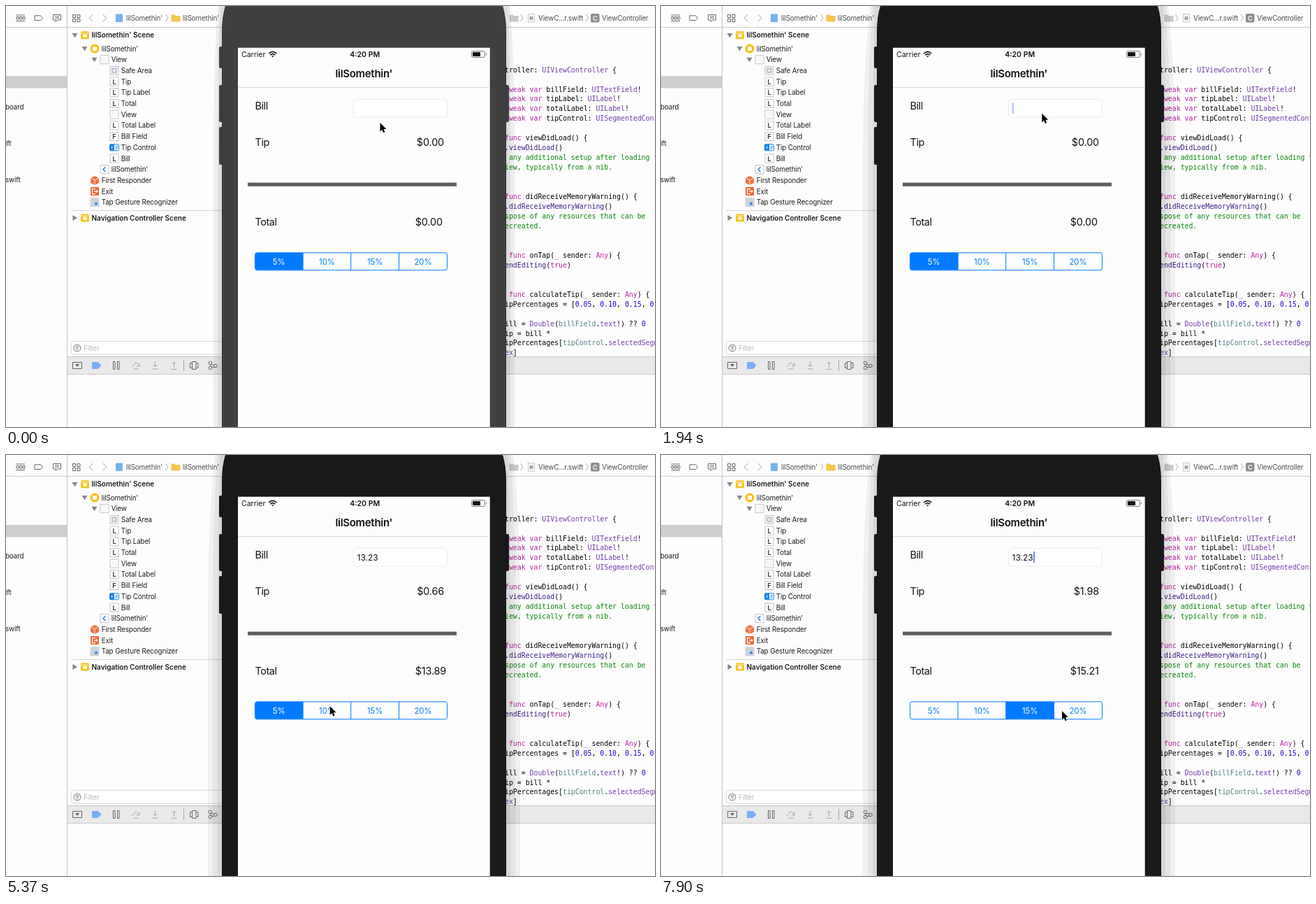
Recreate the animation shown at these times as an HTML page. Size 929 by 602 pixels, loop 8000 ms.

```html
<!DOCTYPE html>
<html lang="en">
<head>
<meta charset="utf-8">
<title>Tip calculator</title>
<style>
  html, body { margin: 0; width: 100%; height: 100%; overflow: hidden; background: #fdfdfd; }
  svg { display: block; }
  text { font-family: Inter, "Liberation Sans", sans-serif; white-space: pre; }
  .ide { font-size: 9.85px; letter-spacing: -.12px; fill: #1c1c1c; }
  .bold { font-size: 10px; font-weight: 600; letter-spacing: 0; }
  .path { fill: #4c4c4c; letter-spacing: -.16px; }
  .letter { font-size: 9.5px; font-weight: 600; text-anchor: middle; fill: #333; }
  .code text { font-family: "DejaVu Sans Mono", monospace; font-size: 9.85px; fill: #000; }
  .k { fill: #b4239f; } .t { fill: #703daa; } .p { fill: #4f8187; }
  .f { fill: #3d1d81; } .c { fill: #0a850a; } .n { fill: #1c00cf; }
  .label { font-size: 14.4px; letter-spacing: -.4px; fill: #111; }
  .sum { letter-spacing: -.15px; }
  .title { font-size: 15px; font-weight: 600; letter-spacing: -.3px; }
  .status { font-size: 10.5px; fill: #111; }
  .mid { text-anchor: middle; }
  .end { text-anchor: end; }
  .seg text { font-size: 11.3px; text-anchor: middle; }
  .line { fill: none; stroke: #666; stroke-width: 1; }
  .dim { stroke: #a6a6a6; }
</style>
</head>
<body>
<svg width="929" height="602" viewBox="0 0 929 602">
  <defs>
    <rect id="frame" x="-6" y="-6" width="12" height="12" fill="#fff" stroke="#c4c4c4"/>
    <g id="scene"><rect x="-6" y="-5.5" width="12" height="11" rx="1.5" fill="#f6c21c"/><path d="M-6-3H6" stroke="#fff3c4"/><rect x="-3" y="-1.5" width="6" height="4.5" rx="1" fill="#fff6d8"/></g>
    <g id="vc"><circle r="6.5" fill="#f9bf13"/><rect x="-3" y="-3" width="6" height="6" rx="1" fill="#fff"/></g>
    <g id="view"><use href="#frame"/><rect x="-4" y="-4" width="8" height="8" fill="#f6f6f6"/></g>
    <g id="safe"><use href="#frame"/><rect x="-4.5" y="-4.5" width="9" height="9" fill="#d5dce5"/><rect x="-2" y="-2.5" width="4" height="5" fill="#fff" stroke="#8a9aaf" stroke-width=".8"/></g>
    <g id="L"><use href="#frame"/><text class="letter" y="3.5">L</text></g>
    <g id="F"><use href="#frame"/><text class="letter" y="3.5">F</text></g>
    <g id="control"><rect x="-6.5" y="-4.5" width="13" height="9" rx="1.5" fill="#fff" stroke="#1480f0"/><path d="M-6.5-4.5H0V4.5H-6.5Z" fill="#1480f0"/><path d="M-3.3-2V2" stroke="#fff"/><path d="M2-1.8H4.4V0H2V2H4.6" fill="none" stroke="#1480f0" stroke-width=".8"/></g>
    <g id="back"><use href="#frame"/><path d="M1.5-3.5L-2 0L1.5 3.5" fill="none" stroke="#1473e6" stroke-width="1.3"/></g>
    <g id="cube"><path d="M0-6.5L6-3.5V3.5L0 6.5L-6 3.5V-3.5Z" fill="#ee7443"/><path d="M-6-3.5L0-.5L6-3.5M0-.5V6.5" fill="none" stroke="#fff" stroke-width=".8"/></g>
    <g id="exit"><rect x="-6" y="-6" width="12" height="12" rx="1" fill="#ec6a38"/><path d="M1-3.5H-3.5V3.5H1M-1 0H4M2.3-1.8L4 0L2.3 1.8" fill="none" stroke="#fff" stroke-width="1.1"/></g>
    <g id="tap"><rect x="-6.5" y="-6.5" width="13" height="13" fill="#d0d2d6"/><circle cx="2" cy="2" r="3.2" fill="#a9c9f0"/><circle cx="2" cy="2" r="1.7" fill="#2377de"/></g>
    <path id="open" d="M-4-2.5H4L0 4Z" fill="#858585"/>
    <path id="shut" d="M-2.5-4L4 0L-2.5 4Z" fill="#858585"/>
    <path id="sep" d="M-1.5-5L2 0L-1.5 5" fill="none" stroke="#b0b0b0"/>
    <path id="folder" d="M-6.5-5H-1.5L0-3.5H6.5V5H-6.5Z"/>
  </defs>

  <rect width="929" height="602" fill="#fdfdfd"/>

  <!-- navigator -->
  <rect y="100" width="87" height="17.5" fill="#cfcfcf"/>
  <g class="ide">
    <text x="-1" y="147.5">board</text><text x="-1" y="199.5">ift</text><text x="-1" y="251.5">swift</text>
  </g>
  <path d="M0 30.5H929" stroke="#cbcbcb"/>
  <path d="M87.5 0V602" stroke="#c2c2c2"/>
  <g class="line">
    <path d="M14.5 13H27M14.5 21.5H27M15 15.5H18V19H15ZM19.5 15.5H22.5V19H19.5ZM24 15.5H27V19H24Z"/>
    <path d="M41 13.8H49.5L52.5 17.2L49.5 20.6H41Z"/>
    <path d="M67.5 12.5H78.5V20H73.5L71 22.5V20H67.5ZM70 15H76M70 17.3H76"/>
    <path d="M95.5 12.5H99.5V16.5H95.5ZM102 12.5H106V16.5H102ZM95.5 18.5H99.5V22.5H95.5ZM102 18.5H106V22.5H102Z"/>
    <path class="dim" d="M124.5 12L119 17.2L124.5 22.5M138.5 12L144 17.2L138.5 22.5"/>
  </g>

  <!-- jump bar -->
  <rect x="157" y="11.5" width="10" height="11.5" rx="1" fill="#72b4ee"/>
  <use href="#sep" x="230" y="17"/>
  <use href="#folder" x="243" y="17.5" fill="#f3c74b"/>
  <use href="#folder" x="727" y="17.5" fill="#c9c9c9"/>
  <use href="#sep" x="738" y="17"/>
  <rect x="747.5" y="11.5" width="9" height="11.5" fill="#fff" stroke="#c6c6c6"/><rect x="749.5" y="15" width="5" height="5" fill="#a6a6a6"/>
  <use href="#sep" x="831.5" y="17"/>
  <rect x="837" y="11" width="12.5" height="12.5" rx="2" fill="#8d8d8d"/>
  <text class="letter" x="843.2" y="20.7" style="fill:#fff">C</text>
  <g class="ide">
    <text class="path" x="172" y="20.8">lilSomethin'</text><text class="path" x="253" y="20.8">lilSomethin'</text>
    <text class="path" x="762" y="20.8">ViewC...r.swift</text><text class="path" x="853" y="20.8">ViewController</text>
  </g>

  <!-- outline -->
  <g id="tree" class="ide">
    <use href="#open" x="98.5" y="41.5"/><use href="#scene" x="113" y="41.8"/>
    <text class="bold" x="122.5" y="45.4">lilSomethin' Scene</text>
    <use href="#shut" x="98" y="303"/><use href="#scene" x="113" y="303"/>
    <text class="bold" x="122.5" y="306.6">Navigation Controller Scene</text>
  </g>
  <path d="M93 292.5H309" stroke="#d3d3d3"/>
  <rect x="93.5" y="479.5" width="220" height="18.5" rx="2" fill="#fff" stroke="#dadada"/>
  <circle class="line" cx="102" cy="489" r="5" style="stroke:#777"/>
  <path class="line" d="M99 487H105M100 489.2H104M101 491.3H103" style="stroke:#777"/>
  <text class="ide" x="111" y="492.5" style="fill:#b9b9b9">Filter</text>

  <!-- debug bar -->
  <rect x="88" y="501" width="841" height="25.5" fill="#e9e9e9"/>
  <path d="M88 501.5H929M88 526.5H929" stroke="#c9c9c9"/>
  <g class="line">
    <path d="M95.5 509.5H108.5V518.5H95.5Z"/><path d="M99 512H105L102 516Z" fill="#666" stroke="none"/>
    <path d="M123.5 509.5H132L136 514L132 518.5H123.5Z" fill="#7aaef6" stroke="#7aaef6"/>
    <path d="M153.5 508.5H156V519.5H153.5ZM159.5 508.5H162V519.5H159.5Z"/>
    <path class="dim" d="M180 516L186 509.5L191 514.5M191 510.5V515H187M182.5 519H189.5"/>
    <path class="dim" d="M213.5 508V516M210.5 513L213.5 516L216.5 513M209.5 519H217.5"/>
    <path class="dim" d="M240.5 517V509M237.5 512L240.5 509L243.5 512M236.5 519.5H244.5"/>
    <path class="dim" d="M254.5 506V522"/>
    <path d="M266.5 508.5H272V519.5H266.5ZM266 510.5H263.5V517.5H266M272.5 510.5H275V517.5H272.5"/>
    <path d="M294 512L298 514M294 516L298 517M293 513V515"/>
    <circle cx="292.5" cy="510.5" r="2.3"/><circle cx="292.5" cy="517.5" r="2.3"/><circle cx="300" cy="514.5" r="2.3"/>
  </g>

  <g id="code" class="code"></g>

  <!-- phone -->
  <g id="idle"></g>
  <g id="active"></g>
  <g id="body">
    <path d="M305 59.5Q305 58 307 58H310V89H307Q305 89 305 87ZM305 115Q305 113 307 113H310V166H307Q305 166 305 164ZM305 175Q305 173 307 173H310V227H307Q305 227 305 225ZM715 113H718Q720 113 720 115V164Q720 166 718 166H715Z"/>
    <path d="M309 602V38Q309 16 314 0H711Q716 16 716 38V602Z"/>
  </g>
  <path d="M309.5 602V38Q309.5 16 314.5 0M715.5 602V38Q715.5 16 710.5 0" fill="none" stroke="#000" stroke-opacity=".25"/>
  <rect x="332" y="59.7" width="360.7" height="543" fill="#fdfdfd"/>

  <text class="status" x="337" y="73">Carrier</text>
  <g fill="none" stroke="#111" stroke-width="1.7">
    <path d="M376.2 68Q381.7 62.8 387.2 68M378.3 70.2Q381.7 67 385.1 70.2"/>
    <path d="M380 71.2H383.4L381.7 73.4Z" fill="#111" stroke="none"/>
  </g>
  <text class="status mid" x="513.7" y="73" font-weight="600">4:20 PM</text>
  <rect x="666.5" y="64.5" width="19" height="9" rx="2" fill="none" stroke="#777"/>
  <rect x="668" y="66" width="11" height="6" rx=".8" fill="#111"/>
  <path d="M687 67.2Q689 69 687 70.8Z" fill="#777"/>
  <text class="label title mid" x="512.3" y="102">lilSomethin'</text>
  <path d="M332 116.5H693" stroke="#dadada"/>

  <g class="label">
    <text x="356.5" y="148">Bill</text><text x="356.5" y="200">Tip</text><text x="356.5" y="313.5">Total</text>
    <text id="tip" class="sum end" x="627" y="199.5"></text>
    <text id="total" class="sum" x="585.7" y="313.5"></text>
  </g>
  <rect x="497.5" y="133.5" width="134" height="25.5" rx="4" fill="#fff" stroke="#ececec"/>
  <text id="bill" x="502.5" y="150.5" style="font-size:12px;fill:#111"></text>
  <rect id="caret" y="138" width="1.6" height="16" fill="#3f6fe0"/>
  <rect x="346" y="252.6" width="299" height="5.2" fill="#5e5e5e"/>

  <clipPath id="round"><rect x="356.5" y="352.8" width="275" height="25" rx="3"/></clipPath>
  <g id="seg" class="seg" clip-path="url(#round)"></g>
  <path d="M425 353V378M493.7 353V378M562.5 353V378" stroke="#007aff"/>
  <rect x="356.5" y="352.8" width="275" height="25" rx="3" fill="none" stroke="#007aff"/>

  <path id="pointer" d="M0 0V12.4L2.8 9.8L4.7 14.2L6.9 13.3L5 9H8.9Z" stroke="#fff" stroke-width="1.1" paint-order="stroke"/>
</svg>

<script>
const $ = id => document.getElementById(id);
const add = (parent, markup) => parent.insertAdjacentHTML('beforeend', markup);

// [label, depth, icon, expanded]
[["lilSomethin'", 0, 'vc', 1], ['View', 1, 'view', 1], ['Safe Area', 2, 'safe'], ['Tip', 2, 'L'],
 ['Tip Label', 2, 'L'], ['Total', 2, 'L'], ['View', 2, 'view'], ['Total Label', 2, 'L'],
 ['Bill Field', 2, 'F'], ['Tip Control', 2, 'control'], ['Bill', 2, 'L'], ["lilSomethin'", 1, 'back'],
 ['First Responder', 0, 'cube'], ['Exit', 0, 'exit'], ['Tap Gesture Recognizer', 0, 'tap']
].forEach(([label, depth, icon, open], i) => {
  const x = 127 + 14 * depth, y = 61 + 15.7 * i;
  add($('tree'), `<use href="#${icon}" x="${x}" y="${y}"/><text x="${x + 9.7}" y="${y + 3.5}">${label}</text>` +
    (open ? `<use href="#open" x="${x - 14.5}" y="${y - .5}"/>` : ''));
});

// «class text» marks a coloured token
`troller: «t UIViewController» {

 «k weak» «k var» billField: «t UITextField»!
 «k weak» «k var» tipLabel: «t UILabel»!
 «k weak» «k var» totalLabel: «t UILabel»!
 «k weak» «k var» tipControl: «t UISegmentedControl»!

«k func» viewDidLoad() {
.«f viewDidLoad»()
«c  any additional setup after loading the»
«c iew, typically from a nib.»


«k func» didReceiveMemoryWarning() {
.«f didReceiveMemoryWarning»()
«c spose of any resources that can be»
«c ecreated.»


 «k func» onTap(«k _» sender: «k Any») {
«f endEditing»(«k true»)


 «k func» calculateTip(«k _» sender: «k Any») {
ipPercentages = [«n 0.05», «n 0.10», «n 0.15», «n 0.20»]

ill = «t Double»(«p billField».«t text»!) ?? «n 0»
ip = bill *
ipPercentages[«p tipControl».«t selectedSegmentInd»
«t ex»]`.split('\n').forEach((line, i) => add($('code'),
  `<text x="714" y="${94.6 + 13.96 * i}">${line.replace(/«(\w) (.*?)»/g, '<tspan class="$1">$2</tspan>')}</text>`));

// banded shadow that narrows towards the top
const shade = (parent, d, alpha) => {
  const l = 309 - d, r = 716 + d, n = d * .5;
  add(parent, `<path fill="#000" fill-opacity="${alpha}" d="M${l} 602V230C${l} 120 ${l + n * .4} 60 ${l + n} 0H${r - n}C${r - n * .4} 60 ${r} 120 ${r} 230V602Z"/>`);
};
[[12, .06], [6, .07]].forEach(b => shade($('idle'), ...b));
[[20, .05], [13, .05], [6, .06]].forEach(b => shade($('active'), ...b));

const rates = [.05, .1, .15, .2];
const segs = rates.map((rate, i) => {
  const x = 356.5 + 68.75 * i;
  add($('seg'), `<g><rect x="${x}" y="352.8" width="68.75" height="25" fill="#007aff"/><text x="${x + 34.2}" y="369.6">${Math.round(rate * 100)}%</text></g>`);
  return $('seg').lastElementChild.children;
});

// each track holds its value until the next time
const pointer = [[0, 535.5, 167], [150, 545, 157], [450, 545.3, 153.8], [4780, 554, 172], [4930, 548, 250],
  [5080, 500, 330], [5230, 441, 355], [5370, 463.7, 359.3], [5520, 461.6, 359.3], [6570, 468, 361],
  [6720, 492, 365], [6870, 514, 367], [7020, 521, 367.5], [7160, 522.3, 368], [7760, 548, 367], [7900, 574, 366]];
const focus = [[0, 0], [450, .5], [600, 1]];
const typed = [[0, ''], [2090, '1'], [2240, '13'], [2540, '13.'], [2690, '13.2'], [3590, '13.23']];
const caret = [[0, 0], [1040, 1], [1940, .5], [2090, 1], [3290, .4], [3440, 0], [3590, 1], [4180, .4], [4330, 0],
  [4630, 1], [5080, .6], [5230, 0], [5520, .3], [5670, 1], [6120, .25], [6270, 0], [6570, 1], [7160, 0], [7610, 1]];
// [time, previous, selected, highlighted, old fill, new fill]
const choice = [[0, 0, 0, 0, 1, 1], [5970, 0, 0, 1, 1, .15], [6120, 0, 1, 1, .2, .82], [6270, 0, 1, 1, 0, 1],
  [7310, 1, 1, 2, 1, .15], [7460, 1, 2, 2, .2, .82], [7610, 1, 2, 2, 0, 1]];

const at = (track, t) => track.filter(s => s[0] <= t).pop().slice(1);
const money = v => '$' + v.toFixed(2);

function draw(t) {
  const [x, y] = at(pointer, t);
  $('pointer').setAttribute('transform', `translate(${x} ${y})`);

  const [on] = at(focus, t), g = 64 - 38 * on;
  $('body').setAttribute('fill', `rgb(${g},${g},${g})`);
  $('idle').style.opacity = 1 - on;
  $('active').style.opacity = on;

  const [text] = at(typed, t), [old, sel, hot, before, after] = at(choice, t);
  const bill = Number(text), tip = bill * rates[sel];
  $('bill').textContent = text;
  $('caret').setAttribute('x', 503 + (text ? $('bill').getComputedTextLength() : 0));
  $('caret').style.opacity = at(caret, t)[0];
  $('tip').textContent = money(tip);
  $('total').textContent = money(bill + tip);

  segs.forEach(([box, label], i) => {
    const k = i === hot ? after : i === old ? before : 0;
    const w = k > .15 ? k : 0;
    box.style.opacity = k;
    label.setAttribute('fill', `rgb(${255 * w},${122 + 133 * w},255)`);
  });
}

const start = performance.now();
function tick() {
  draw((performance.now() - start) % 8000);
  requestAnimationFrame(tick);
}
tick();
</script>
</body>
</html>
```
